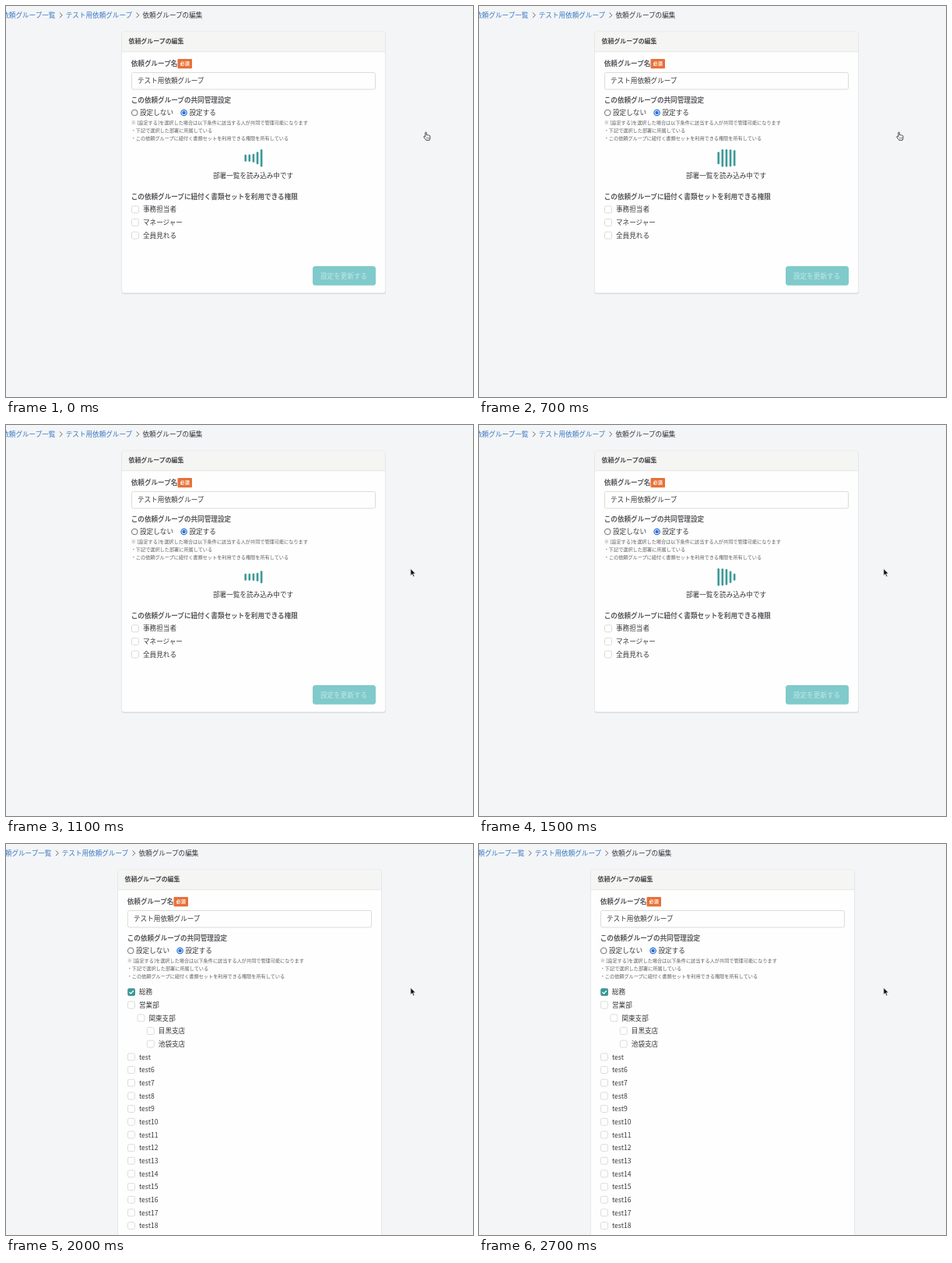
An HTML page for the animation above (3100 ms loop, 600x502 px).

```html
<!DOCTYPE html>
<html>
<head>
<meta charset="utf-8">
<style>
html, body { margin: 0; width: 100%; height: 100%; overflow: hidden; background: #f3f5f7; }
svg { display: block; }
text { font: 500 8.6px "Noto Sans CJK JP", "Noto Sans CJK", sans-serif; fill: #38383c; white-space: pre; }
.bold { font-weight: 700; fill: #5c5c60; }
.head { font-size: 7.95px; fill: #4c4c50; }
.link { fill: #3a78c4; }
.note { font-size: 6.16px; fill: #606060; }
.badge { font-size: 6.1px; font-weight: 700; fill: #fff; }
.button { fill: #c4e8e8; }
.field { fill: #fefefe; stroke: #dcdcd8; }
.line { fill: none; stroke: #66666a; }
</style>
</head>
<body>
<svg width="600" height="502" viewBox="0 0 600 502">
  <g id="page">
    <path class="line" d="M69 8.5l3.3 3.3l-3.3 3.3M167.5 8.5l3.3 3.3l-3.3 3.3"/>
    <rect id="shadow" x="148.5" y="34" width="339.5" height="336" rx="3" fill="#dcdfe1"/>
    <rect id="card" x="148.5" y="33" width="339" height="335.5" rx="3" fill="#fefefe" stroke="#e5e7e9"/>
    <path d="M149 58.5V36q0-2.5 2.5-2.5h333q2.5 0 2.5 2.5v22.5z" fill="#f5f5f3"/>
    <path d="M149 58.7h338" stroke="#e5e6e6"/>
    <rect x="220.5" y="68" width="18.5" height="12.2" rx="1" fill="#e87038"/>
    <rect class="field" x="161.5" y="85.5" width="313" height="21.5" rx="2"/>
    <circle cx="165.2" cy="137" r="3.8" fill="#fff" stroke="#707074"/>
    <circle cx="228.6" cy="137" r="3.7" fill="#fff" stroke="#2b6fd6" stroke-width="1.2"/>
    <circle cx="228.6" cy="137" r="2.2" fill="#2b6fd6"/>
    <g id="form"></g>
    <g id="loading">
      <g id="bars" fill="#3c9a98"></g>
      <rect x="394" y="334" width="81" height="24.7" rx="3.5" fill="#80cacb"/>
    </g>
    <g id="loaded">
      <rect x="161.2" y="185.2" width="9.8" height="9.8" rx="2" fill="#3c9896"/>
    </g>
  </g>
  <g id="hand" transform="translate(536 161.5)" fill="#fff" stroke="#333338" stroke-width=".9" stroke-linejoin="round">
    <path d="M2.7 6.6V1.4q0-.9.8-.9t.8.9v2.9q.9-.6 1.6.1q.9-.4 1.5.3q1.5-.2 1.5 1.2v1.9q0 1.4-.9 3H3.8Q2.4 8.7.9 7.1q-.6-1 .4-1.2q.8 0 1.4.7z"/>
    <path d="M4.6 7v2M6 7v2M7.4 7v2" stroke-width=".6"/>
  </g>
  <path id="arrow" d="M0 0v9l2.1-2l1.5 3.4l1.5-.7L3.6 6.4h2.9z" fill="#111" stroke="#fff" stroke-width=".7"/>
</svg>
<script>
const $ = id => document.getElementById(id);

function add(parent, tag, attrs, content = '') {
  const el = document.createElementNS('http://www.w3.org/2000/svg', tag);
  for (const key in attrs) el.setAttribute(key, attrs[key]);
  el.textContent = content;
  return parent.appendChild(el);
}

// y is the vertical middle of the line
const write = (parent, x, y, content, style = '', size = 8.6) =>
  add(parent, 'text', { x, y: y + size * 0.37, class: style }, content);

function checkbox(parent, x, y, label, checked) {
  if (!checked) add(parent, 'rect', { class: 'field', x: x + .5, y: y - 4.5, width: 9, height: 9, rx: 2 });
  write(parent, x + 15, y, label);
}

const form = $('form'), loading = $('loading'), loaded = $('loaded');
write(form, -4.8, 11.6, '依頼グループ一覧', 'link');
write(form, 76.7, 11.6, 'テスト用依頼グループ', 'link');
write(form, 175.5, 11.6, '依頼グループの編集');
write(form, 157.5, 45.3, '依頼グループの編集', 'bold head', 7.95);
write(form, 160.7, 74, '依頼グループ名', 'bold');
write(form, 223.6, 74.2, '必須', 'badge', 6.1);
write(form, 169, 96.3, 'テスト用依頼グループ');
write(form, 160.7, 120.7, 'この依頼グループの共同管理設定', 'bold');
write(form, 172, 137.3, '設定しない');
write(form, 235.5, 137.3, '設定する');
[
  '※ [設定する]を選択した場合は以下条件に該当する人が共同で管理可能になります',
  '・下記で選択した部署に所属している',
  '・この依頼グループに紐付く書類セットを利用できる権限を所有している'
].forEach((note, i) => write(form, 160.7, 149.5 + i * 10, note, 'note', 6.16));

write(loading, 266, 217.5, '部署一覧を読み込み中です');
write(loading, 160.7, 244.7, 'この依頼グループに紐付く書類セットを利用できる権限', 'bold');
['事務担当者', 'マネージャー', '全員見れる'].forEach((label, i) =>
  checkbox(loading, 161, 261.3 + i * 16.6, label));
write(loading, 404, 346.4, '設定を更新する', 'button');

const tests = Array.from({ length: 13 }, (_, i) => 'test' + (i + 6));
const indent = { 関東支部: 1, 目黒支店: 2, 池袋支店: 2 };
['総務', '営業部', '関東支部', '目黒支店', '池袋支店', 'test', ...tests].forEach((label, i) =>
  checkbox(loaded, 161 + 12.4 * (indent[label] || 0), 190 + i * 16.67, label, i === 0));
add(loaded, 'path', { d: 'M163.5 190.2l1.9 1.9l3.5-3.8', fill: 'none', stroke: '#fff', 'stroke-width': 1.3 });

const bars = Array.from({ length: 5 }, (_, i) =>
  add($('bars'), 'rect', { x: 306.4 + i * 5.12, width: 2.6, rx: 1.2 }));

// cubic-bezier(.2, .68, .18, 1.08)
function ease(x) {
  const curve = (a, b, s) => 3 * (1 - s) ** 2 * s * a + 3 * (1 - s) * s * s * b + s ** 3;
  let low = 0, high = 1;
  for (let i = 0; i < 20; i++) {
    const mid = (low + high) / 2;
    if (curve(.2, .18, mid) < x) low = mid; else high = mid;
  }
  return curve(.68, 1.08, low);
}

function barScale(phase) {
  const half = (phase % 1000) / 500;
  return half < 1 ? 1 - .6 * ease(half) : .4 + .6 * ease(half - 1);
}

const show = (el, on) => el.setAttribute('display', on ? 'inline' : 'none');

function draw(now) {
  const time = Math.floor((now % 3100) / 100) * 100;
  const done = time >= 2000;
  show(loading, !done);
  show(loaded, done);
  $('page').setAttribute('transform', `translate(${done ? -5 : 0})`);
  $('card').setAttribute('height', done ? 500 : 335.5);
  $('shadow').setAttribute('height', done ? 500 : 336);

  bars.forEach((bar, i) => {
    const height = 22.4 * barScale(time + 1365 - i * 100);
    bar.setAttribute('y', 195.2 - height / 2);
    bar.setAttribute('height', height);
  });

  const move = Math.min(1, Math.max(0, (time - 700) / 400));
  const glide = move * move * (3 - 2 * move);
  show($('hand'), move === 0);
  show($('arrow'), move > 0);
  $('arrow').setAttribute('transform', `translate(${539 - 19.2 * glide} ${162 + 22.5 * glide})`);
  requestAnimationFrame(() => draw(performance.now()));
}
draw(0);
</script>
</body>
</html>
```
